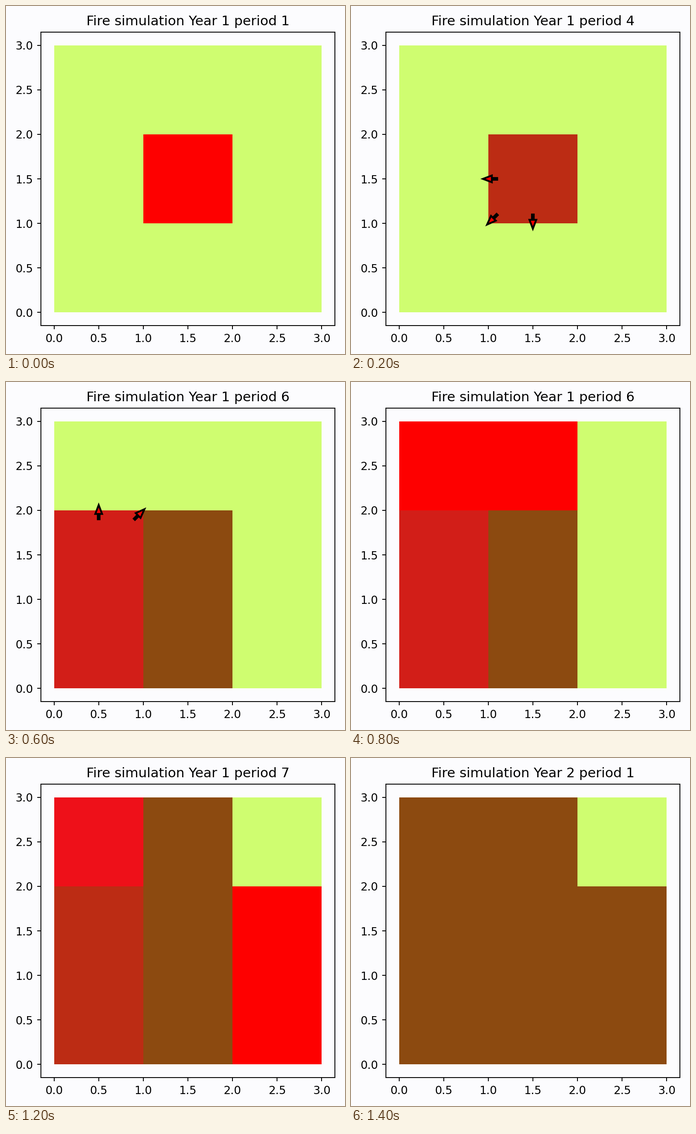
A matplotlib script for the animation above (1.6 s loop, 738x759 px).

```python
import math

import matplotlib.pyplot as plt
from matplotlib.animation import FuncAnimation
from matplotlib.patches import FancyArrow, Rectangle

WIDTH, HEIGHT, DPI = 738, 759, 128
PT = 72 / DPI  # points per pixel
LEFT, RIGHT, TOP, BOTTOM = 75.6, 716.2, 56.7, 697.4  # axes edges in pixels
BACK = "#fcfcfe"
GREEN, BROWN, RED = "#cffd70", "#8c4a10", "#fe0000"
EMBER, COOLING, FRESH = "#bc2c14", "#d21e18", "#ee1019"
GRID = [(col, row) for row in range(3) for col in range(3)]


def paint(color, *cells):
    return dict.fromkeys(cells, color)


MIDDLE = {
    **paint(COOLING, (0, 0), (0, 1)),
    **paint(BROWN, (1, 0), (1, 1)),
}
LATE = {
    **paint(EMBER, (0, 0), (0, 1)),
    **paint(BROWN, (1, 0), (1, 1), (1, 2)),
    **paint(FRESH, (0, 2)),
}

# (year, period, coloured cells, spreading cell, spread directions)
STEPS = [
    (1, 1, paint(RED, (1, 1)), None, []),
    (1, 4, paint(EMBER, (1, 1)), (1, 1), [(-1, 0), (-1, -1), (0, -1)]),
    (1, 4, {**paint(EMBER, (1, 1)), **paint(RED, (0, 0), (0, 1), (1, 0))}, None, []),
    (1, 6, MIDDLE, (0, 1), [(0, 1), (1, 1)]),
    (1, 6, {**MIDDLE, **paint(RED, (0, 2), (1, 2))}, None, []),
    (1, 7, LATE, (1, 0), [(1, 0), (1, 1)]),
    (1, 7, {**LATE, **paint(RED, (2, 0), (2, 1))}, None, []),
    (2, 1, paint(BROWN, *GRID[:-1]), None, []),
]

plt.rcParams["font.family"] = "DejaVu Sans"
fig = plt.figure(figsize=(WIDTH / DPI, HEIGHT / DPI), dpi=DPI, facecolor=BACK)
ax = fig.add_axes([LEFT / WIDTH, 1 - BOTTOM / HEIGHT,
                   (RIGHT - LEFT) / WIDTH, (BOTTOM - TOP) / HEIGHT])
ax.set(xlim=(-0.15, 3.15), ylim=(-0.15, 3.15), facecolor=BACK)
ticks = [i / 2 for i in range(7)]
ax.set_xticks(ticks)
ax.set_yticks(ticks)
ax.tick_params(labelsize=24.3 * PT, length=8.4 * PT, width=1.9 * PT, pad=8.4 * PT)
for spine in ax.spines.values():
    spine.set_linewidth(1.9 * PT)
title = ax.set_title("", fontsize=29.15 * PT, pad=14.7 * PT)

squares = {c: ax.add_patch(Rectangle(c, 1, 1, linewidth=0)) for c in GRID}
arrows = []


def add_arrow(cell, direction):
    """Point from just inside the cell's edge towards its neighbour."""
    dx, dy = direction
    length = 0.06 / math.hypot(dx, dy)
    arrow = FancyArrow(
        cell[0] + 0.5 + 0.4 * dx, cell[1] + 0.5 + 0.4 * dy,
        dx * length, dy * length,
        width=0.02, head_width=0.076, head_length=0.1,
        facecolor=RED, edgecolor="black", linewidth=4 * PT, zorder=3,
    )
    arrows.append(ax.add_patch(arrow))


def update(frame):
    year, period, colors, source, directions = STEPS[frame]
    title.set_text(f"Fire simulation Year {year} period {period}")
    for cell, square in squares.items():
        square.set_facecolor(colors.get(cell, GREEN))
    while arrows:
        arrows.pop().remove()
    for direction in directions:
        add_arrow(source, direction)
    return [title, *squares.values(), *arrows]


anim = FuncAnimation(fig, update, frames=len(STEPS), interval=200, repeat=True,
                     repeat_delay=0, init_func=lambda: update(0), blit=False)
plt.show()
```
